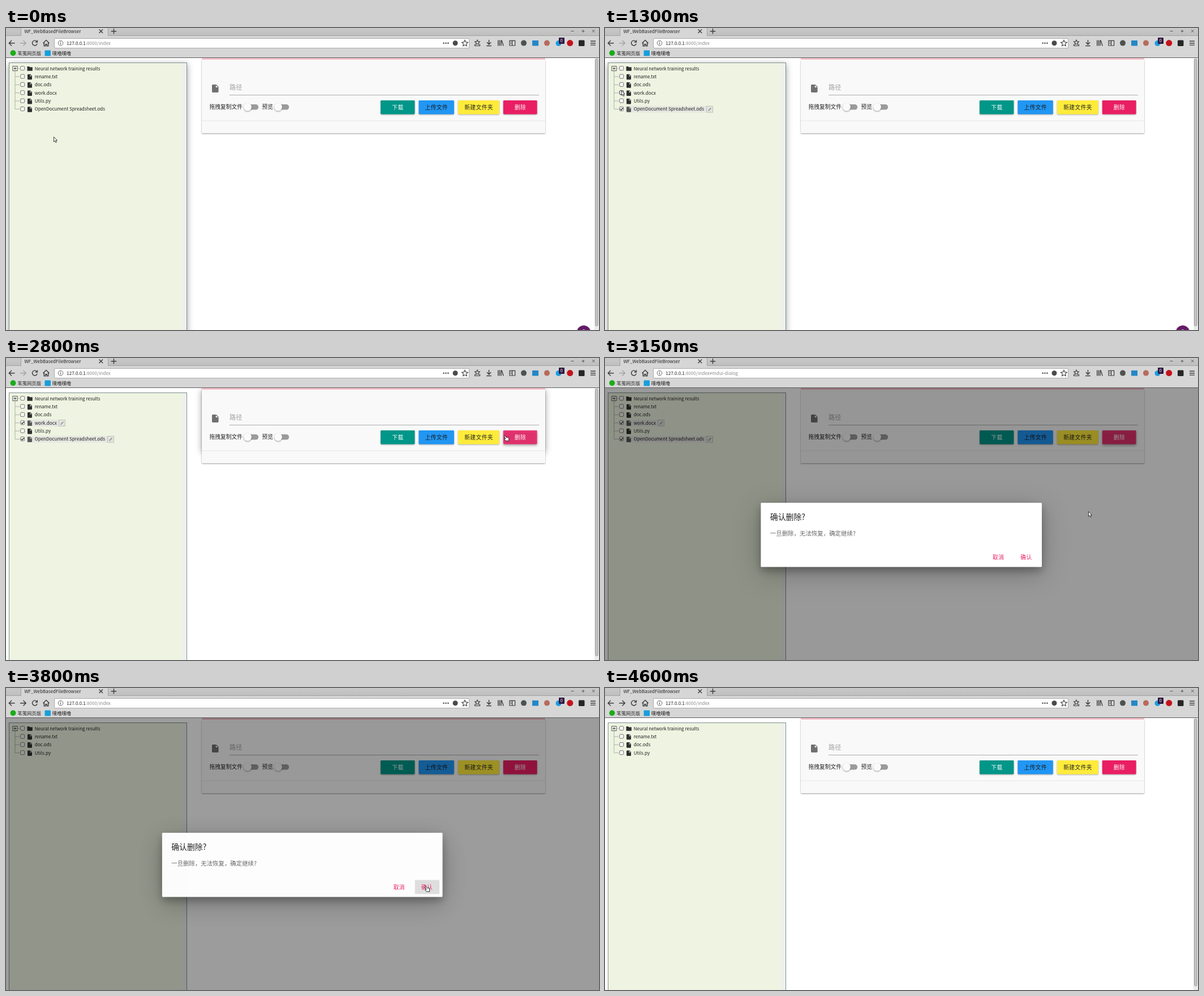
Animation of 1048x534 px, one loop 4650 ms. Source, as an HTML page:

```html
<!DOCTYPE html>
<html>
<head>
<meta charset="utf-8">
<title>WF_WebBasedFileBrowser</title>
<style>
html, body { margin: 0; width: 100%; height: 100%; overflow: hidden; background: #fff; }
svg { display: block; }
text { font: 8.05px "Noto Sans CJK SC", "Noto Sans CJK", sans-serif; fill: #222; white-space: pre; }
.mark { font-size: 8.36px; }
.ui { font-size: 9.76px; }
.btn text { font-size: 9.76px; letter-spacing: .39px; text-anchor: middle; }
.btn rect { filter: drop-shadow(0 1.1px 1.1px rgba(0,0,0,.32)); }
.btn.hover rect { fill-opacity: .87; filter: drop-shadow(0 2px 2.2px rgba(0,0,0,.4)); }
.line { fill: none; stroke: #3c3c3c; stroke-width: 1.4; }
.pink { fill: #e91e63; }
</style>
</head>
<body>
<svg width="1048" height="534" viewBox="0 0 1048 534">
  <defs>
    <path id="file" d="M0 1Q0 0 1 0H5.2L8 2.8V8.6Q8 9.6 7 9.6H1Q0 9.6 0 8.6ZM4.7.8V3.4H7.3Z"/>
    <g id="switch">
      <rect x="-6" y="-4.8" width="25.2" height="9.6" rx="4.8" fill="#9b9b9b"/>
      <circle r="7" fill="#fafafa" style="filter:drop-shadow(0 1px 1.2px rgba(0,0,0,.4))"/>
    </g>
    <linearGradient id="strip" x2="0" y2="1"><stop stop-color="#c9c9c9"/><stop offset="1" stop-color="#bebebe"/></linearGradient>
  </defs>

  <!-- page -->
  <rect y="53" width="1048" height="481" fill="#fff"/>
  <rect id="panel" x="5.5" y="61.5" width="314" height="480" fill="#eef4e1" stroke="#7c8f8c"/>
  <rect x="311" y="62" width="8" height="472" fill="#eff0ee"/>
  <g id="tree"></g>

  <rect x="346" y="56" width="607" height="130" rx="1" fill="#f9f9f9" style="filter:drop-shadow(0 1.2px 1.2px rgba(0,0,0,.4))"/>
  <rect id="card" x="346" y="54" width="607" height="110" fill="#f9f9f9"/>
  <rect x="346" y="164" width="607" height="22" rx="1" fill="#f9f9f9"/>
  <path d="M346 164H953" stroke="#e6e6e6"/>
  <rect x="346" y="53" width="607" height="3" fill="#f4c1c9"/>
  <use href="#file" transform="translate(364 100) scale(1.45)" fill="#707070"/>
  <text x="395" y="108.6" style="font-size:11.15px;fill:#a0a0a0">路径</text>
  <path d="M395 118.6H942" stroke="#999" stroke-width=".8"/>
  <text class="ui" x="359.5" y="142.6">拖拽复制文件</text>
  <text class="ui" x="452.5" y="142.6">预览</text>
  <use href="#switch" x="427" y="139.8"/>
  <use href="#switch" x="481" y="139.8"/>
  <g id="buttons"></g>
  <g id="fab">
    <circle cx="1021" cy="538" r="12" fill="#641a68" style="filter:drop-shadow(0 2px 2px rgba(0,0,0,.4))"/>
    <path d="M1019.5 533.5h3" stroke="#d9c6da"/>
  </g>
  <g id="scrollbar">
    <rect x="1040" y="53" width="8" height="481" fill="#ececec"/>
    <rect x="1041.5" y="54.5" width="4.6" height="472.5" rx="2.3" fill="#c2c2c2" stroke="#969696" stroke-width=".8"/>
  </g>

  <!-- dialog -->
  <rect id="dim" y="53" width="1048" height="481"/>
  <g id="dialog">
    <rect x="275.4" y="256" width="496.6" height="113.6" rx="1.4" fill="#fff" style="filter:drop-shadow(0 7px 7px rgba(0,0,0,.25)) drop-shadow(0 10px 22px rgba(0,0,0,.26))"/>
    <text x="291.8" y="285.6" style="font-size:13.9px;font-weight:500">确认删除?</text>
    <text x="291.8" y="314" style="font-size:10.45px;fill:#666">一旦删除，无法恢复，确定继续?</text>
    <rect id="okHover" x="723" y="339.5" width="43.5" height="24.8" rx="1.4" fill="#e0e0e0"/>
    <text class="ui pink" x="685" y="355.6" letter-spacing=".39">取消</text>
    <text class="ui pink" x="734.3" y="355.6" letter-spacing=".39">确认</text>
  </g>

  <!-- browser bars -->
  <rect width="1048" height="53" fill="#d6d6d6"/>
  <rect width="1048" height="13.5" fill="url(#strip)"/>
  <rect x="27" width="153" height="14" fill="#d6d6d6"/>
  <path d="M0 13.5H27M180 13.5H1048M26.5 0V13.5M180.5 0V13.5" class="line" style="stroke:#a2a2a2;stroke-width:1"/>
  <path d="M0 52.5H1048" stroke="#5c5c5c"/>
  <text x="32.5" y="9">WF_WebBasedFileBrowser</text>
  <path class="line" d="M164.5 2.5l6.6 6.6m0-6.6l-6.6 6.6M185.8 5.8h9.4M190.5 1.1v9.4"/>
  <path class="line" style="stroke-width:1;stroke:#555" d="M998.5 5.5h5M1017.5 5.5h5M1020 3v5M1036 3l4.6 4.6m0-4.6l-4.6 4.6"/>
  <rect x="85.5" y="18.5" width="733" height="17" rx="1.5" fill="#fff" stroke="#aaa"/>
  <path class="line" d="M15.5 26.7H5.5M10 22L5.3 26.7L10 31.4"/>
  <path class="line" id="forward" d="M25 26.7H35M30.5 22L35.2 26.7L30.5 31.4"/>
  <path class="line" d="M54.3 23.7A4.4 4.4 0 1 0 55.2 27.6M55.4 21.5V25H51.8"/>
  <path class="line" d="M65.5 27L71 21.6L76.5 27M67.3 26v5.7h2.5v-3h2.4v3h2.5V26"/>
  <circle class="line" cx="96.5" cy="26.7" r="4.3" style="stroke:#666;stroke-width:1"/>
  <path d="M96.5 24v1.1M96.5 25.9v3.4" stroke="#555"/>
  <text x="107.3" y="30">127.0.0.1<tspan id="url" fill="#8c8c8c"></tspan></text>
  <g fill="#4a4a4a">
    <circle cx="773.6" cy="26.7" r="1.3"/><circle cx="777.5" cy="26.7" r="1.3"/><circle cx="781.4" cy="26.7" r="1.3"/>
    <circle cx="794" cy="26.7" r="4.5"/>
  </g>
  <path class="line" style="stroke-width:1.1" d="M811 21.4l1.6 3.5 3.8.4-2.8 2.6.8 3.8-3.4-1.9-3.4 1.9.8-3.8-2.8-2.6 3.8-.4z"/>
  <path class="line" style="stroke-width:1.1" d="M833 21l1.3 2.9 3.1.3-2.3 2.1.6 3-2.7-1.5-2.7 1.5.6-3-2.3-2.1 3.1-.3zM828.5 28.5v3h9v-3"/>
  <path class="line" d="M853.5 21v7.5M849.8 25.2l3.7 3.7 3.7-3.7M849.2 31.5h8.6"/>
  <path class="line" d="M869.8 21.6v10M872.4 21.6v10M875 21.6v10M876 21.8l3.2 9.8"/>
  <path class="line" style="stroke-width:1.2" d="M890 22.4h9.6v8.6h-9.6zM894.6 22.4V31M891.5 25h2M891.5 27.5h2"/>
  <circle cx="915" cy="26.6" r="5" fill="#4d5350"/>
  <rect x="930" y="22" width="11" height="9.5" fill="#2487c8"/>
  <circle cx="956" cy="26.6" r="5" fill="#b86b5d"/>
  <circle cx="976.5" cy="27" r="5" fill="#1c9ce0"/>
  <rect x="977" y="17" width="10" height="11" rx="1" fill="#30163f"/>
  <text x="979.8" y="25.2" style="font-size:7.4px;fill:#fff">0</text>
  <circle cx="996.8" cy="26.6" r="5.5" fill="#c4121c"/>
  <rect x="1012" y="21.5" width="10.5" height="10.5" rx="1.5" fill="#262626"/>
  <path class="line" d="M1033 23.3h9M1033 26.7h9M1033 30.1h9"/>
  <circle cx="12.5" cy="44.3" r="5" fill="#1aad19"/>
  <rect x="68.5" y="39.5" width="10.5" height="10" rx="1" fill="#169fdb"/>
  <text class="mark" x="20.3" y="48">苇笺网页版</text>
  <text class="mark" x="81.8" y="48">噗噜噗噜</text>

  <path id="arrow" d="M.5.6V9.1L2.4 7.4 3.9 10.6 5.4 9.9 4 6.7H6.5Z" fill="#fff" stroke="#222" stroke-width=".9"/>
  <path id="hand" d="M.8 1.2Q2 .2 2.8 1.6L4.2 3.8 7 3.6Q8.6 4 8.7 6L8.6 10H3.4L.9 7.2Q.2 6 1.6 5.9L2.9 6.4.7 2.4Z" fill="#fff" stroke="#222" stroke-width="1"/>
</svg>
<script>
const $ = id => document.getElementById(id);
const show = (id, on) => $(id).style.display = on ? "" : "none";
const raise = (id, level) => $(id).style.filter =
  level ? `drop-shadow(0 3.5px 6px rgba(0,0,0,${.38 * level}))` : "none";
const LOOP = 4650, TICK = 50;

$("buttons").innerHTML = [
  ["download", 662, 60.4, "#009688", "#fff", "下载"],
  ["upload", 729.4, 62.4, "#2196f3", "#1c1c1c", "上传文件"],
  ["create", 799, 72.8, "#ffeb3b", "#222", "新建文件夹"],
  ["remove", 878.8, 59.8, "#e91e63", "#fff", "删除"]
].map(([id, x, w, bg, fg, label]) =>
  `<g id="${id}" class="btn"><rect x="${x}" y="127.9" width="${w}" height="24.6" rx="1.4" fill="${bg}"/>
   <text x="${x + w / 2 + .2}" y="143.6" style="fill:${fg}">${label}</text></g>`).join("");

const ROW = 14.36, TOP = 71.6;
const SHEET = "OpenDocument Spreadsheet.ods", WORK = "work.docx";
const FILES = ["Neural network training results", "rename.txt", "doc.ods", WORK, "Utils.py", SHEET];
const TAG_END = { [WORK]: 93, [SHEET]: 179 };

function row(name, i, checked, hovered) {
  const y = TOP + i * ROW, on = checked.includes(name), end = TAG_END[name];
  const icon = i
    ? `<use href="#file" x="38" y="${y - 4.2}" fill="${on ? "#575757" : "#2e2e2e"}"/>`
    : `<path d="M37.5 ${y - 3.6}h3.6l1 1.2h4.7v6.6h-9.3z" fill="#2e2e2e"/>
       <rect x="12" y="${y - 4}" width="8" height="8" fill="#f6faee" stroke="#555"/>
       <path d="M13.7 ${y}h4.6M16 ${y - 2.3}v4.6" stroke="#333"/>`;
  const tag = on
    ? `<rect x="36" y="${y - 5.6}" width="${end - 36}" height="11.6" fill="#e5e6e1"/>
       <rect x="${end + .5}" y="${y - 5.2}" width="11" height="11" fill="#e3e4df" stroke="#b5b7b0" stroke-width=".8"/>
       <path d="M${end + 3.6} ${y + 2.9}l4.8-4.8" stroke="#999" stroke-width="1.8"/>` : "";
  const tick = on ? `<path class="line" d="M26.8 ${y - .3}l1.9 1.9 3.2-3.8"/>` : "";
  return `${tag}<path d="M${i ? 16 : 21} ${y}H24" stroke="#a5aa9e" stroke-width=".9"/>
    <rect x="25.7" y="${y - 3.9}" width="7" height="7" rx="1.2" fill="#f6f8f1" stroke="${hovered === name ? "#333" : "#777"}"/>
    ${tick}${icon}<text x="50.7" y="${y + 3}">${name}</text>`;
}

let shown = "";
function drawTree(files, checked, hovered) {
  const key = [files, checked, hovered].join("|");
  if (key === shown) return;
  shown = key;
  $("tree").innerHTML = `<path d="M16 ${TOP + 4}V${TOP + (files.length - 1) * ROW}" stroke="#a5aa9e" stroke-width=".9"/>`
    + files.map((name, i) => row(name, i, checked, hovered)).join("");
}

// Eased move in discrete ticks between two points
function glide(t, start, steps, [x0, y0], [x1, y1]) {
  const p = Math.min(1, (Math.floor((t - start) / TICK) + 1) / steps);
  const e = p * p * (3 - 2 * p);
  return [x0 + (x1 - x0) * e, y0 + (y1 - y0) * e];
}

function pointer(t) {
  if (t < 200) return [84, 192];
  if (t < 750) return glide(t, 200, 11, [84, 192], [29, 142]);
  if (t < 950) return [28, 141];
  if (t < 2200) return glide(t, 950, 8, [28, 141], [28.6, 110]);
  if (t < 2450) return [600, 140];
  if (t < 2800) return [820, 136];
  if (t < 3150) return [880, 136.6];
  if (t < 3450) return [854, 271];
  if (t < 3800) return [771, 340];
  if (t < 4200) return [740, 350];
  return [163.4, 39];
}

function draw(t) {
  const within = (a, b) => t >= a && t < b;
  const open = within(3150, 4200), closing = t >= 3800;
  const checked = closing ? [] : [SHEET, WORK].filter((_, i) => t >= [950, 2200][i]);
  const hovered = within(650, 1050) ? SHEET : within(1250, 2200) ? WORK : "";
  drawTree(closing ? FILES.filter(f => f !== WORK && f !== SHEET) : FILES, checked, hovered);

  // Hover shadow passes from the panel to the card
  raise("panel", t < 2200 ? 1 : t < 2450 ? .5 : 0);
  raise("card", within(2200, 2450) ? .5 : within(2450, 3150) ? 1 : 0);
  $("create").classList.toggle("hover", within(2450, 2800));
  $("remove").classList.toggle("hover", within(2800, 3450));

  show("fab", t < 2200);
  show("scrollbar", !open);
  show("dim", open);
  show("dialog", open);
  show("okHover", closing);
  $("dim").setAttribute("fill-opacity", closing ? .39 : .4);
  $("dialog").setAttribute("opacity", closing ? .98 : 1);
  $("dialog").setAttribute("transform", closing ? "translate(523.7 312.8) scale(.998) translate(-523.7 -312.8)" : "");

  $("url").textContent = ":8000/index" + (within(3150, 3800) ? "#mdui-dialog" : "");
  $("forward").style.stroke = closing ? "#3c3c3c" : "#a3a3a3";

  const hand = within(2450, 3150) || within(3800, 4200);
  show("arrow", !hand && t < 4600);
  show("hand", hand);
  $(hand ? "hand" : "arrow").setAttribute("transform", `translate(${pointer(t)})`);
}

const begin = performance.now();
function frame() {
  draw((performance.now() - begin) % LOOP);
  requestAnimationFrame(frame);
}
frame();
</script>
</body>
</html>
```
